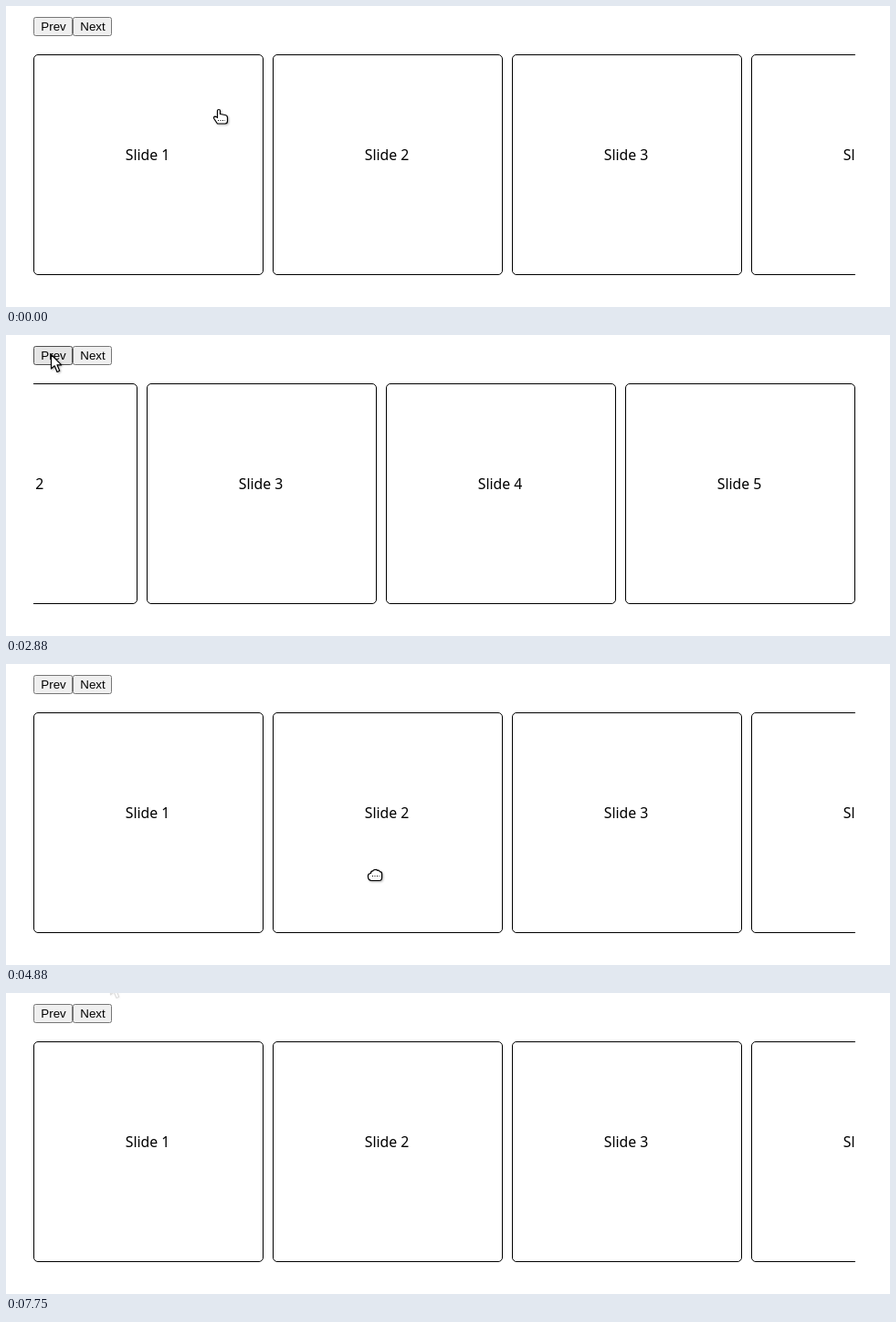
Write an HTML page that moves like this. It is 968 px wide and 330 px high and loops after 8250 ms.

```html
<!DOCTYPE html>
<html lang="en">
<head>
<meta charset="utf-8">
<title>Slider</title>
<style>
  html, body { margin: 0; width: 100%; height: 100%; overflow: hidden; background: #fff; }
  #stage { position: relative; width: 968px; height: 330px; overflow: hidden; background: #fff; color: #000; }
  .button {
    position: absolute; top: 12px; box-sizing: border-box; width: 43px; height: 21px; padding-left: 1px;
    border: 1px solid #767676; border-radius: 2.5px; background: #efefef;
    font: 13.333px/19px "Liberation Sans", Arial, sans-serif; text-align: center;
  }
  .button.hover { background: #e5e5e5; border-color: #4f4f4f; }
  #prev { left: 30px; }
  #next { left: 73px; }
  #viewport { position: absolute; left: 30px; top: 53px; width: 900px; height: 242px; overflow: hidden; }
  #row { display: flex; gap: 10px; }
  .slide {
    flex: none; box-sizing: border-box; width: 252px; height: 242px; padding: 98px 2px 0 0;
    border: 1px solid #000; border-radius: 5px;
    font: 15.8px/22px "Noto Sans", "Open Sans", sans-serif; text-align: center;
  }
  #cursor { position: absolute; left: 0; top: 0; overflow: visible; filter: drop-shadow(1px 1px 1px rgba(0, 0, 0, .3)); }
  #cursor path { fill: #fff; stroke: #000; stroke-width: 1.2; stroke-linejoin: round; }
  #cursor .dots { fill: none; stroke-width: 1; stroke-dasharray: 1 1.5; }
</style>
</head>
<body>
<div id="stage">
  <div id="prev" class="button">Prev</div>
  <div id="next" class="button">Next</div>
  <div id="viewport"><div id="row"></div></div>
  <svg id="cursor" width="1" height="1">
    <g id="arrow"><path d="M.5 .5V16L4.2 12.8L7 19.5L9.7 18.3L7 11.8H11.7Z"/></g>
    <g id="hand">
      <path d="M-3.5 .5V-6a1.5 1.5 0 0 1 3 0V-2.5L5-1.5Q7.5-1 7.5 1.5V5q0 3-2.5 3H-3.5L-7.2 2.5q-.8-2.2 1.2-2.4q1.5 0 2.5 1.4Z"/>
      <path class="dots" d="M-3 4.5H5"/>
    </g>
    <g id="grab">
      <path d="M-4.5-1.5q0-2.6 2.2-2.6q.8-1.5 2.3-1.2q1.5-.8 2.6.6q2-.5 2.6 1.3q2.4 0 2.4 2.6V3q0 3.5-3 3.5h-8q-4.2 0-4.2-5q0-2.8 3.1-3Z"/>
      <path class="dots" d="M-3 1.5H5"/>
    </g>
  </svg>
</div>
<script>
  const LOOP = 8250, TICK = 125, SPRING = 0.0116, OVERSCROLL = 0.35;
  const STEP = 262, LAST_STEP = 138;
  const $ = id => document.getElementById(id);

  for (let n = 1; n <= 5; n++) {
    const slide = document.createElement('div');
    slide.className = 'slide';
    slide.textContent = 'Slide ' + n;
    $('row').append(slide);
  }

  const home = { x: 235, y: 121 };
  const moves = [
    { from: 0, to: 750, x: 100, y: 24 },      // to Next
    { from: 2375, to: 2875, x: 49, y: 21 },   // to Prev
    { from: 4250, to: 4875, x: 404, y: 231 }, // onto the slides
    { from: 4875, to: 5240, x: 105, y: 207 }, // drag left
    { from: 5375, to: 5750, x: 195, y: 60 },
    { from: 5750, to: 6250, x: 724, y: 220 }, // drag right, past the start
    { from: 7125, to: 7750, x: 114, y: -14 }  // out at the top
  ];
  const clicks = [
    { at: 929, by: STEP }, { at: 1650, by: LAST_STEP },
    { at: 2930, by: -LAST_STEP }, { at: 3462, by: -STEP }
  ];
  const drags = [
    { press: 4875, release: 5240, by: STEP },
    { press: 5750, release: 6500, by: -STEP }
  ];

  const clamp = u => Math.min(1, Math.max(0, u));
  const ease = u => u * u * (3 - 2 * u);

  function mouseAt(t) {
    return moves.reduce((p, m) => {
      const k = ease(clamp((t - m.from) / (m.to - m.from)));
      return { x: p.x + (m.x - p.x) * k, y: p.y + (m.y - p.y) * k };
    }, home);
  }

  // Critically damped spring from 0 to 1
  function settle(elapsed) {
    const x = Math.max(0, elapsed) * SPRING;
    return 1 - (1 + x) * Math.exp(-x);
  }

  function dragOffset({ press, release, by }, t) {
    if (t < press) return 0;
    const pulled = mouseAt(press).x - mouseAt(Math.min(t, release)).x;
    return pulled + (by - pulled) * settle(t - release);
  }

  function scrollAt(t) {
    let scroll = 0;
    for (const click of clicks) scroll += click.by * settle(t - click.at);
    for (const drag of drags) scroll += dragOffset(drag, t);
    return scroll < 0 ? scroll * OVERSCROLL : scroll;
  }

  function draw(t) {
    const { x, y } = mouseAt(t);
    const pressed = drags.some(d => t >= d.press && t < d.release);
    const shape = pressed ? 'grab' : y < 45 ? 'arrow' : 'hand';
    const hovers = left => y >= 12 && y < 33 && x >= left && x < left + 43;

    $('row').style.transform = `translateX(${-Math.round(scrollAt(t))}px)`;
    $('prev').classList.toggle('hover', hovers(30));
    $('next').classList.toggle('hover', hovers(73));
    $('cursor').style.transform = `translate(${Math.round(x)}px, ${Math.round(y)}px)`;
    $('cursor').style.opacity = y < 0 ? 0.13 : 1;
    for (const id of ['arrow', 'hand', 'grab']) $(id).style.display = id === shape ? '' : 'none';
  }

  const start = performance.now();
  function frame() {
    const t = (performance.now() - start) % LOOP;
    draw(Math.floor(t / TICK) * TICK);
    requestAnimationFrame(frame);
  }
  frame();
</script>
</body>
</html>
```
